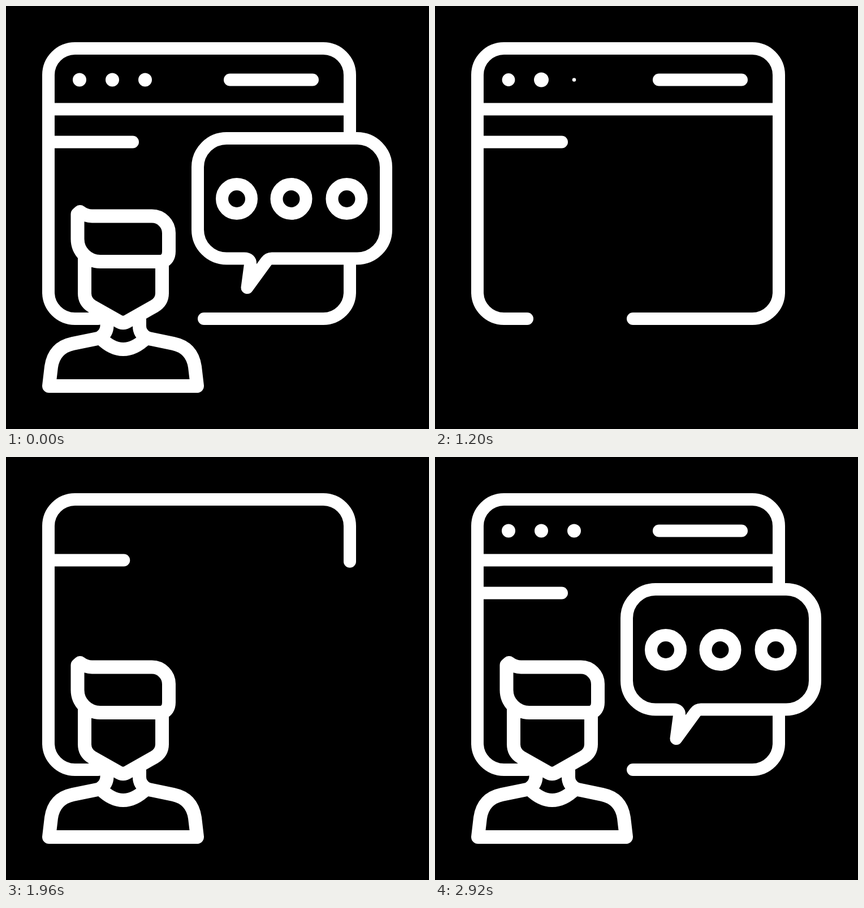
Animation of 748x748 px, one loop 3.12 s. Source, as an HTML page:

```html
<!DOCTYPE html>
<html lang="en">
<head>
<meta charset="utf-8">
<title>Online chat icon</title>
<style>
  html, body { margin: 0; height: 100%; overflow: hidden; background: #000; }
  svg { display: block; width: 100vw; height: 100vh; }
  .line { fill: none; stroke: #fff; stroke-width: 22; stroke-linecap: round; stroke-linejoin: round; }
  .solid { fill: #000; }
  .dot { fill: #fff; }
  #person { stroke-width: 24; }
  #bubble { transform-origin: 426px 498px; }
</style>
</head>
<body>
<svg viewBox="0 0 748 748">
  <g class="line">
    <path class="draw" data-start="1840" data-end="2040" pathLength="1" d="M163 553H122A47 47 0 0 1 75 506V122A47 47 0 0 1 122 75H561A47 47 0 0 1 608 122V506A47 47 0 0 1 561 553H350"/>
    <path class="draw" data-start="1920" data-end="2040" pathLength="1" d="M75 182.5H608"/>
    <path class="draw" data-start="1960" data-end="2080" pathLength="1" d="M75 240.5H224"/>
    <path class="draw" data-start="1960" data-end="2080" pathLength="1" d="M396 130.5H542"/>
  </g>
  <g id="dots"></g>
  <path id="bubble" class="line solid" d="M426.5 498L460 452Q464 446.5 470 446.5H621A51 51 0 0 0 672 395.5V285A51 51 0 0 0 621 234H390A51 51 0 0 0 339 285V395.5A51 51 0 0 0 390 446.5H421Q433 446.5 432 457Z"/>
  <g id="rings"></g>
  <g id="person" class="line">
    <path class="solid" d="M76 672L80 638Q85 604 118 597L167 587Q207 627 248 587L296 597Q329 604 334 638L338 672Z"/>
    <path d="M165 540L178.5 553V566Q178 578 168 585M236 555V566Q236 579 248 586"/>
    <path class="solid" d="M139 448V508Q139 523 152 531L198 557Q207 563 216 557L262 531Q276 523 276 508V448"/>
    <path class="solid" d="M258 371.5H152Q141 371.5 131 364L126.5 368V412A40 40 0 0 0 166.5 452H276Q288 448 288 434V402A30 30 0 0 0 258 371.5Z"/>
  </g>
</svg>
<script>
const LOOP = 3120, STEP = 40, MIRROR = 3400;
const $ = id => document.getElementById(id);
const clamp = v => Math.min(1, Math.max(0, v));
const ease = p => (1 - Math.cos(Math.PI * clamp(p))) / 2;

function addCircles(parent, xs, y, r, cls) {
  return xs.map(x => {
    const c = document.createElementNS("http://www.w3.org/2000/svg", "circle");
    c.setAttribute("class", cls);
    c.setAttribute("cx", x);
    c.setAttribute("cy", y);
    c.setAttribute("r", r);
    c.style.transformOrigin = `${x}px ${y}px`;
    parent.append(c);
    return c;
  });
}

const dots = addCircles($("dots"), [130, 188, 246], 130.5, 12, "dot");
const rings = addCircles($("rings"), [408, 504.5, 602.5], 341, 26, "line");
const strokes = [...document.querySelectorAll(".draw")];

// Grow past full size, dip, then settle.
function pop(t, peak) {
  if (t < 120) return peak * ease(t / 120);
  if (t < 200) return peak + (0.95 - peak) * ease((t - 120) / 80);
  return 0.95 + 0.05 * ease((t - 200) / 80);
}

function setScale(el, s) {
  el.style.transform = `scale(${s})`;
  el.style.visibility = s > 0 ? "visible" : "hidden";
}

function draw(t) {
  // Everything but the person leaves by playing its entrance backwards.
  const u = Math.max(t, MIRROR - t);
  for (const el of strokes) {
    const { start, end } = el.dataset;
    const p = ease((u - start) / (end - start));
    el.style.visibility = p > 0 ? "visible" : "hidden";
    el.style.strokeDasharray = p < 1 ? `${p} 2` : "none";
  }
  dots.forEach((el, i) => setScale(el, pop(u - 2000 - 80 * i, 1.08)));
  setScale($("bubble"), pop(u - 2200, 1.05));
  rings.forEach((el, i) => setScale(el, pop(u - 2480 - 80 * i, 1.08)));

  const away = t < 1100 ? clamp((t - 412) / 160) : 1 - clamp((t - 1640) / 160);
  $("person").setAttribute("transform", `translate(0 ${400 * away ** 4})`);
}

const begin = performance.now();
function tick() {
  const t = (performance.now() - begin) % LOOP;
  draw(Math.floor(t / STEP) * STEP);
  requestAnimationFrame(tick);
}
tick();
</script>
</body>
</html>
```
